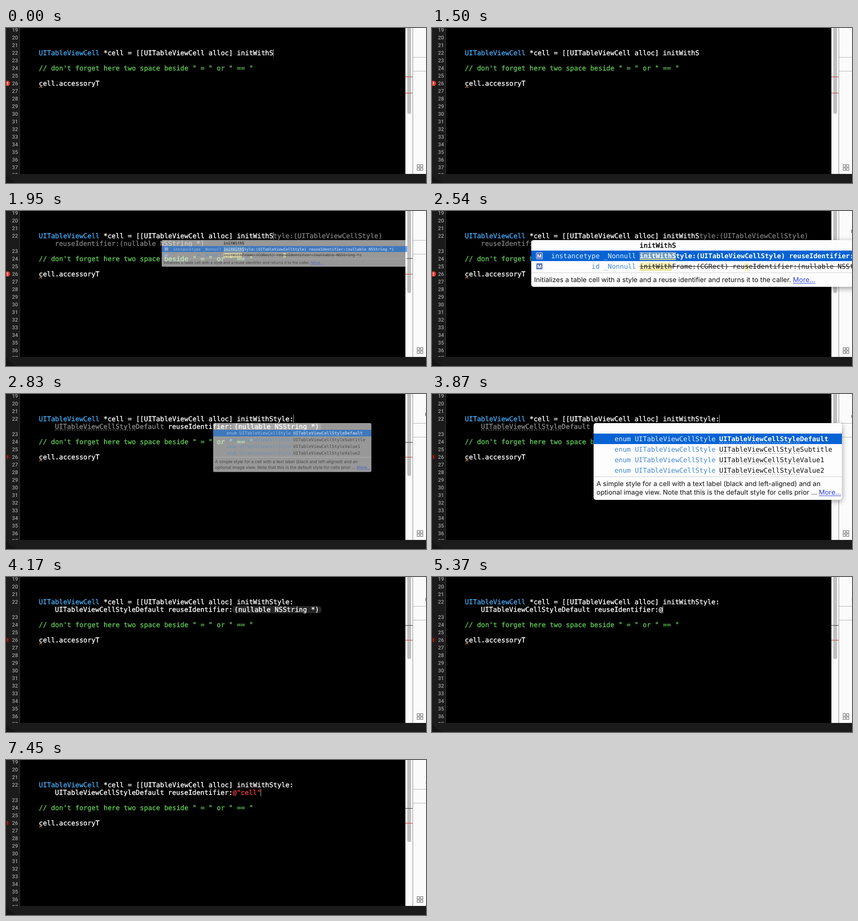
Animation, 876 px wide and 325 px high, one loop 8000 ms. Source, as an HTML page with a canvas:

```html
<!DOCTYPE html>
<html lang="en">
<head>
<meta charset="utf-8">
<title>Code completion</title>
<style>
  html, body { margin: 0; width: 100%; height: 100%; overflow: hidden; background: #000; }
  canvas { display: block; }
</style>
</head>
<body>
<canvas id="stage" width="876" height="325"></canvas>
<script>
const g = document.getElementById('stage').getContext('2d');
g.textRendering = 'geometricPrecision';

const LOOP = 8000, CH = 8.428, X0 = 68.6, X1 = 102;
const MONO = '14px "DejaVu Sans Mono", monospace';
const SANS = '14px Inter, sans-serif';
const WHITE = '#fff', GHOST = '#8b8b8b', TYPE = '#45aaf2', GREEN = '#62c958', RED = '#f23c40', BLUE = '#0663d4';

const within = (t, a, b) => t >= a && t < b;
const latest = (steps, t) => steps.filter(s => s[0] <= t).pop();

function box(x, y, w, h, color, r = 0) {
  g.fillStyle = color;
  g.beginPath();
  g.roundRect(x, y, w, h, r);
  g.fill();
}

function text(s, x, y, color, { font = MONO, align = 'left', heavy = 0 } = {}) {
  g.font = font;
  g.textAlign = align;
  g.fillStyle = g.strokeStyle = color;
  g.fillText(s, x, y);
  if (heavy) {
    g.lineWidth = heavy;
    g.strokeText(s, x, y);
  }
}

const code = (s, x, y, color = WHITE) => text(s, x, y, color, { heavy: 0.35 });

function dashes(x, y, n, color) {
  g.strokeStyle = color;
  g.lineWidth = 1;
  g.setLineDash([3, 2]);
  g.beginPath();
  g.moveTo(x, y);
  g.lineTo(x + n * CH, y);
  g.stroke();
  g.setLineDash([]);
}

// Caret positions over time; null means hidden.
const carets = [
  [0, 557, 44], [450, null], [900, 557, 44], [1500, null], [1950, 557, 44], [2400, null],
  [2680, 599, 44], [3420, null], [3870, 599, 44], [4170, null],
  [5370, 481, 60], [5520, 489, 60], [5960, 498, 60], [6260, 506, 60],
  [6550, 514, 60], [6700, 523, 60], [7150, null], [7450, 531, 60]
];

const typed = [
  [5370, '@'], [5520, '@"'], [5660, '@""'], [5960, '@"c'], [6260, '@"ce"'], [6550, '@"cel"'], [6700, '@"cell"']
];

function gutter(shift, dimmed) {
  box(0, 0, 28, 306, '#1b1b1b');
  box(28, 0, 1, 306, '#3c3c3c');
  for (let n = 19; n <= 38; n++) {
    const y = 56 + (n - 22) * 16 + (n > 22 ? shift : 0);
    text(n, 25, y, '#a2a2a2', { font: '500 11px Roboto, sans-serif', align: 'right' });
  }
  const y = 116 + shift;
  g.fillStyle = dimmed ? '#4b1413' : '#e5372c';
  g.beginPath();
  g.arc(3, y, 5.5, 0, 7);
  g.fill();
  text('!', 3, y + 4, dimmed ? '#d4382f' : WHITE, { font: 'bold 10px Roboto, sans-serif', align: 'center' });
}

function sidebar(t) {
  const wrapped = t >= 1950;
  box(833, 0, 15, 306, '#fafafa');
  box(837, -10, 8, wrapped ? 182 : 190, '#c1c1c1', 4);
  box(833, wrapped ? t < 2100 ? 99 : 101 : 102, 15, 1, wrapped ? '#44312f' : '#c9363c');
  box(833, wrapped ? 132 : 136, 15, 1, '#c9363c');
  box(848, 0, 1, 306, '#8c8c8c');
  box(849, 0, 27, 306, '#fbfbfb');
  box(849, 61, 27, 1, '#b5b5b5');
  box(849, 90, 27, 1, '#b5b5b5');
  if (within(t, 2250, 3130)) box(875, 39, 1, 7, '#222');
  else if (t >= 3130) box(875, 44, 1, 6, t < 5070 ? '#555' : '#ccc');
  g.strokeStyle = '#666';
  g.lineWidth = 1;
  for (const x of [857.5, 864.5])
    for (const y of [286.5, 293.5]) g.strokeRect(x, y, 5, 5);
}

function editor(t) {
  const shift = t >= 1950 ? 16 : 0, accepted = t >= 2680;
  code('UITableViewCell', X0, 57, TYPE);
  code('*cell = [[UITableViewCell alloc] initWithS' + (accepted ? 'tyle:' : ''), X0 + 16 * CH, 57);
  if (shift && !accepted) {
    text('tyle:(UITableViewCellStyle)', X0 + 58 * CH, 57, GHOST, { heavy: 0.2 });
    text('reuseIdentifier:(nullable NSString *)', X1, 73, GHOST, { heavy: 0.2 });
  }
  if (accepted) {
    const ghost = t < 4170;
    code('UITableViewCellStyleDefault', X1, 73, ghost ? GHOST : WHITE);
    if (ghost) dashes(X1, 75.5, 20, GHOST);
    code('reuseIdentifier:', X1 + 28 * CH, 73);
    if (t < 5370) {
      box(472, 61, 186, 15, t < 4770 ? '#262626' : '#2f5f9e', 6);
      code('(nullable NSString *)', 476, 73);
    } else {
      code(latest(typed, t)[1], X1 + 44 * CH, 73, t < 5660 ? WHITE : RED);
    }
  }
  code('// don\'t forget here two space beside " = " or " == "', X0, 89 + shift, GREEN);
  code('cell.accessoryT', X0, 121 + shift);
  g.strokeStyle = '#e8a33d';
  g.lineWidth = 1.2;
  g.beginPath();
  g.moveTo(69.5, 125 + shift);
  g.lineTo(72.5, 122.5 + shift);
  g.lineTo(75.5, 125 + shift);
  g.stroke();

  const [, x, y] = latest(carets, t);
  if (x !== null) box(x, y, 1, 16, '#b8b8b8');
}

// Panel that grows downwards from the caret at the given anchor.
function popup(anchor, scale, alpha, x, w, h, rows, content) {
  g.save();
  g.translate(anchor, 61);
  g.scale(scale, scale);
  g.translate(-anchor, -61);
  g.globalAlpha = alpha;
  g.save();
  if (alpha === 1) {
    g.shadowColor = 'rgba(0,0,0,.4)';
    g.shadowBlur = 12;
    g.shadowOffsetY = 3;
  }
  box(x, 61, w, h, '#fdfdfd', 5);
  g.restore();
  box(x, 83, w, 22, BLUE);
  box(x, 84 + rows * 22 + 1, w, 1, '#cfcfcf');
  content();
  g.restore();
}

function docLine(s, x, y, link) {
  text(s, x, y, '#111', { font: SANS });
  if (!link) return;
  const lx = x + g.measureText(s + ' ').width;
  text('More...', lx, y, '#2a3fe0', { font: SANS });
  box(lx, y + 2, g.measureText('More...').width, 1, '#2a3fe0');
}

function methods() {
  const x = 433;
  text('initWithS', x, 77, '#000', { heavy: 0.5 });
  const args = ' reuseIdentifier:(nullable NSString *)';
  [['instancetype', 'initWithStyle:(UITableViewCellStyle)', 9], ['id', 'initWithFrame:(CGRect)', 8]].forEach(([type, name, hit], i) => {
    const y = 99 + i * 22, on = i === 0;
    box(217, y - 12, 14, 14, '#cbd6f0', 2);
    box(218, y - 11, 12, 12, '#4e6db5', 1);
    text('M', 224, y - 1, WHITE, { font: 'bold 10px Inter, sans-serif', align: 'center' });
    text(type + ' _Nonnull', 425.5, y, on ? '#e3efff' : '#4388d6', { align: 'right' });
    box(x, y - 13, hit * CH, 17, on ? '#6f9dc4' : '#f8f0b8');
    box(x, y + 2, hit * CH, 1.5, '#e6d269');
    if (!on) box(x + 26 * CH, y - 13, CH, 17, '#f8f0b8');
    text(name + args, x, y, on ? WHITE : '#111', { font: on ? 'bold ' + MONO : MONO });
    if (!on) box(x, y - 5, (name + args).length * CH, 1, '#222');
  });
  docLine('Initializes a table cell with a style and a reuse identifier and returns it to the caller.', 213, 149, true);
}

function styles() {
  ['Default', 'Subtitle', 'Value1', 'Value2'].forEach((s, i) => {
    const y = 99 + i * 22, on = i === 0;
    text('enum UITableViewCellStyle', 591.5, y, on ? '#e3efff' : '#4388d6', { align: 'right' });
    text('UITableViewCellStyle' + s, 599, y, on ? WHITE : '#111', { font: on ? 'bold ' + MONO : MONO });
    dashes(599, y + 3.5, 20, on ? '#c9dcf5' : '#999');
  });
  docLine('A simple style for a cell with a text label (black and left-aligned) and an', 343, 193);
  docLine('optional image view. Note that this is the default style for cells prior ...', 343, 211, true);
}

function grow(t, start, mid) {
  return t < start + 150 ? [mid, 0.6] : t < start + 300 ? [0.95, 0.95] : [1, 1];
}

function draw(t) {
  box(0, 0, 876, 325, '#000');
  gutter(t >= 1950 ? 16 : 0, t >= 2680);
  editor(t);
  sidebar(t);
  if (within(t, 1950, 2680)) popup(481, ...grow(t, 1950, 0.57), 207, 898, 98, 2, methods);
  if (within(t, 2830, 4170)) popup(599, ...grow(t, 2830, 0.637), 337, 518, 161, 4, styles);
  box(0, 306, 876, 19, '#1b1b1b');
  g.fillStyle = '#141414';
  g.beginPath();
  g.moveTo(0, 306);
  g.quadraticCurveTo(6, 319, 24, 325);
  g.lineTo(0, 325);
  g.fill();
}

function tick(now) {
  draw(now % LOOP);
  requestAnimationFrame(tick);
}
requestAnimationFrame(tick);
</script>
</body>
</html>
```
